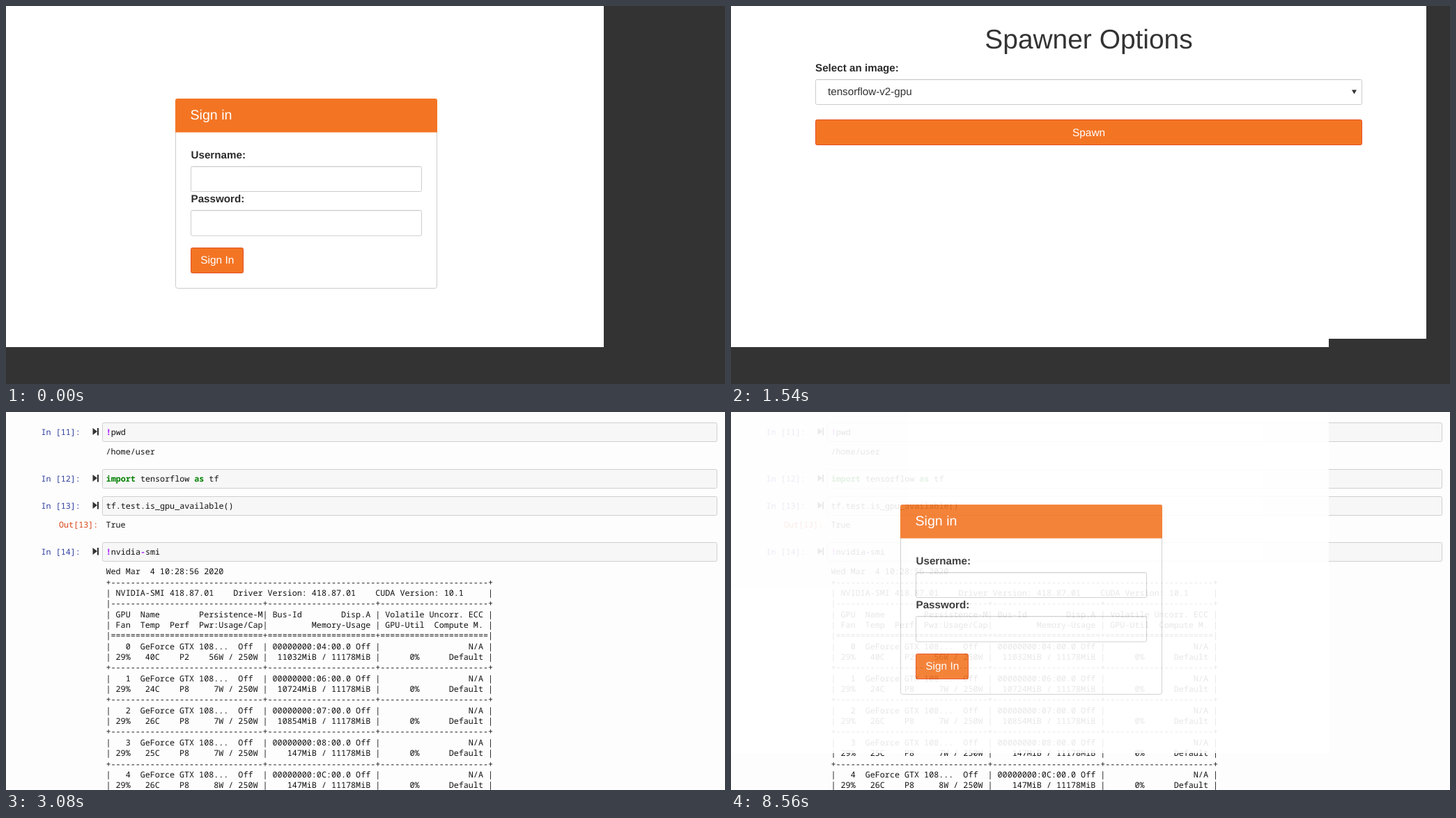
Write an HTML page that moves like this. It is 1032 px wide and 543 px high and loops after 8.62 s.

```html
<!DOCTYPE html>
<html lang="en">
<head>
<meta charset="utf-8">
<title>Notebook sign-in</title>
<style>
  html, body { margin: 0; width: 100%; height: 100%; overflow: hidden; background: #333; }
  .layer { position: absolute; left: 0; top: 0; overflow: hidden; background: #fff; }
  #base, #login { width: 858px; height: 490px; }
  #spawn { width: 858px; height: 478px; }
  #book { width: 998px; height: 478px; background: #fdfdfd; opacity: 0; }
  svg { display: block; position: absolute; left: 0; top: 0; }
  text { white-space: pre; text-rendering: geometricPrecision; }
  .sans { font-family: "Liberation Sans", Arial, sans-serif; font-size: 15.2px; fill: #333; }
  .label { font-weight: bold; fill: #2b2b2b; }
  .btn { font-size: 15.4px; fill: #fff; }
  .head { font-size: 19.6px; fill: #fff; }
  .title { font-size: 38.9px; text-anchor: middle; }
  .mono { font-family: "Noto Sans Mono", "DejaVu Sans Mono", monospace; font-size: 11.72px; fill: #111; }
  .in { fill: #303f9f; }
  .out { fill: #d84315; }
  .kw { fill: #008000; font-weight: bold; }
  .op { fill: #a2f; font-weight: bold; }
</style>
</head>
<body>
<div class="layer" id="base"></div>
<div class="layer" id="spawn"></div>
<div class="layer" id="book"></div>
<div class="layer" id="login"></div>
<script>
const ORANGE = '#f37524', EDGE = '#e34f21', GREY = '#ccc';
const byId = id => document.getElementById(id);

const text = (x, y, str, cls) => `<text x="${x}" y="${y}" class="${cls}" xml:space="preserve">${str}</text>`;
const sans = (x, y, str, cls = '') => text(x, y, str, 'sans ' + cls);
const mono = (x, y, str, cls = '') => text(x, y, str, 'mono ' + cls);
const span = (cls, str) => `<tspan class="${cls}">${str}</tspan>`;
const box = (x, y, w, h, fill, stroke, r = 2) =>
  `<rect x="${x}" y="${y}" width="${w}" height="${h}" rx="${r}" fill="${fill}" stroke="${stroke}"/>`;
const field = (x, y, w, h) => box(x, y, w, h, '#fff', GREY) +
  `<path d="M${x + 1.5} ${y + 1}h${w - 3}" stroke="#f0f0f0"/>`;

function draw(id, parts) {
  byId(id).innerHTML = `<svg width="1032" height="543">${parts.join('')}</svg>`;
}

draw('login', [
  box(243.5, 133.5, 375, 272, '#fff', GREY, 3),
  `<path d="M243 181.500V136q0-3 3-3h370q3 0 3 3v45.500z" fill="${ORANGE}"/>`,
  sans(264.5, 163, 'Sign in', 'head'),
  sans(265.500, 219, 'Username:', 'label'),
  field(265.5, 230.5, 331, 36),
  sans(265.5, 282, 'Password:', 'label'),
  field(265.5, 293.5, 331, 36.5),
  box(265.5, 347.5, 75, 36, ORANGE, EDGE),
  sans(279.3, 370, 'Sign In', 'btn')
]);

draw('spawn', [
  sans(513.5, 61, 'Spawner Options', 'title'),
  sans(121, 94, 'Select an image:', 'label'),
  field(121.5, 105.5, 784, 36),
  `<g fill="#555">${sans(139, 128, 'tensorflow-v2-gpu')}</g>`,
  '<path d="M891 120.500h7l-3.500 6z" fill="#333"/>',
  box(121.5, 163.5, 784, 36, ORANGE, EDGE),
  sans(490, 187, 'Spawn', 'btn')
]);

// Notebook cells: number, box top, code
const cells = [
  [11, 15.5, span('op', '!') + 'pwd'],
  [12, 82.5, span('kw', 'import') + ' tensorflow ' + span('kw', 'as') + ' tf'],
  [13, 121.5, 'tf.test.is_gpu_available()'],
  [14, 187.5, span('op', '!') + 'nvidia' + span('op', '-') + 'smi']
];

const cell = ([n, y, code]) => {
  const base = Math.floor(y + 17.5), mid = base - 5;
  return box(138.5, y, 882, 27, '#f7f7f7', '#cfcfcf') +
    mono(50.5, base, `In [${n}]:`, 'in') +
    `<path d="M124.500 ${mid - 5}l6.500 5l-6.500 5zM131 ${mid - 5}h2v10.500h-2z" fill="#333"/>` +
    mono(143.7, base, code);
};

// Device rows: bus, fan, temperature, state, watts, memory
const gpus = [
  ['04', '40C', 'P2', 56, 11032],
  ['06', '24C', 'P8', 7, 10724],
  ['07', '26C', 'P8', 7, 10854],
  ['08', '25C', 'P8', 7, 147],
  ['0C', '26C', 'P8', 8, 147]
];

const dash = n => '-'.repeat(n), dbl = n => '='.repeat(n);
const rule = dash(31) + '+' + dash(22) + '+' + dash(22) + '+';
const pad = (v, n) => String(v).padStart(n);

const report = [
  'Wed Mar  4 10:28:56 2020',
  '+' + dash(77) + '+',
  '| NVIDIA-SMI 418.87.01    Driver Version: 418.87.01    CUDA Version: 10.1     |',
  '|' + rule,
  '| GPU  Name        Persistence-M| Bus-Id        Disp.A | Volatile Uncorr. ECC |',
  '| Fan  Temp  Perf  Pwr:Usage/Cap|         Memory-Usage | GPU-Util  Compute M. |',
  '|' + dbl(31) + '+' + dbl(22) + '+' + dbl(22) + '|'
];
gpus.forEach(([bus, temp, perf, watts, mem], i) => report.push(
  `|   ${i}  GeForce GTX 108...  Off  | 00000000:${bus}:00.0 Off |${pad('N/A', 21)} |`,
  `| 29%   ${temp}    ${perf}  ${pad(watts, 4)}W / 250W |${pad(mem, 7)}MiB / 11178MiB |      0%      Default |`,
  '+' + rule
));

draw('book', [
  ...cells.map(cell),
  mono(143.5, 61, '/home/user'),
  mono(76, 166, 'Out[13]:', 'out'),
  mono(143.5, 166, 'True'),
  ...report.map((line, i) => mono(143.5, Math.round(233.2 + 15.35 * i), line))
]);

// Timeline: each fade moves in tenths, one every 60 ms
const LOOP = 8620, STEP = 60;
const fade = (start, count, level) =>
  Array.from({ length: count }, (_, i) => [start + i * STEP, { opacity: level((i + 1) / 10) }]);
const size = (w, h) => ({ width: w + 'px', height: h + 'px' });

function play(id, steps) {
  const frames = steps.map(([t, props]) => ({ ...props, offset: t / LOOP, easing: 'step-end' }));
  frames.push({ ...frames[frames.length - 1], offset: 1 });
  byId(id).animate(frames, { duration: LOOP, iterations: Infinity });
}

play('login', [
  [0, { opacity: 1 }],
  ...fade(1000, 10, k => 1 - k),
  ...fade(8080, 9, k => k)
]);
play('spawn', [
  [0, size(858, 478)],
  [1540, size(998, 478)]
]);
play('book', [
  [0, { opacity: 0, ...size(998, 478) }],
  ...fade(2540, 9, k => k),
  [3080, { opacity: 1, ...size(1032, 543) }]
]);
</script>
</body>
</html>
```
